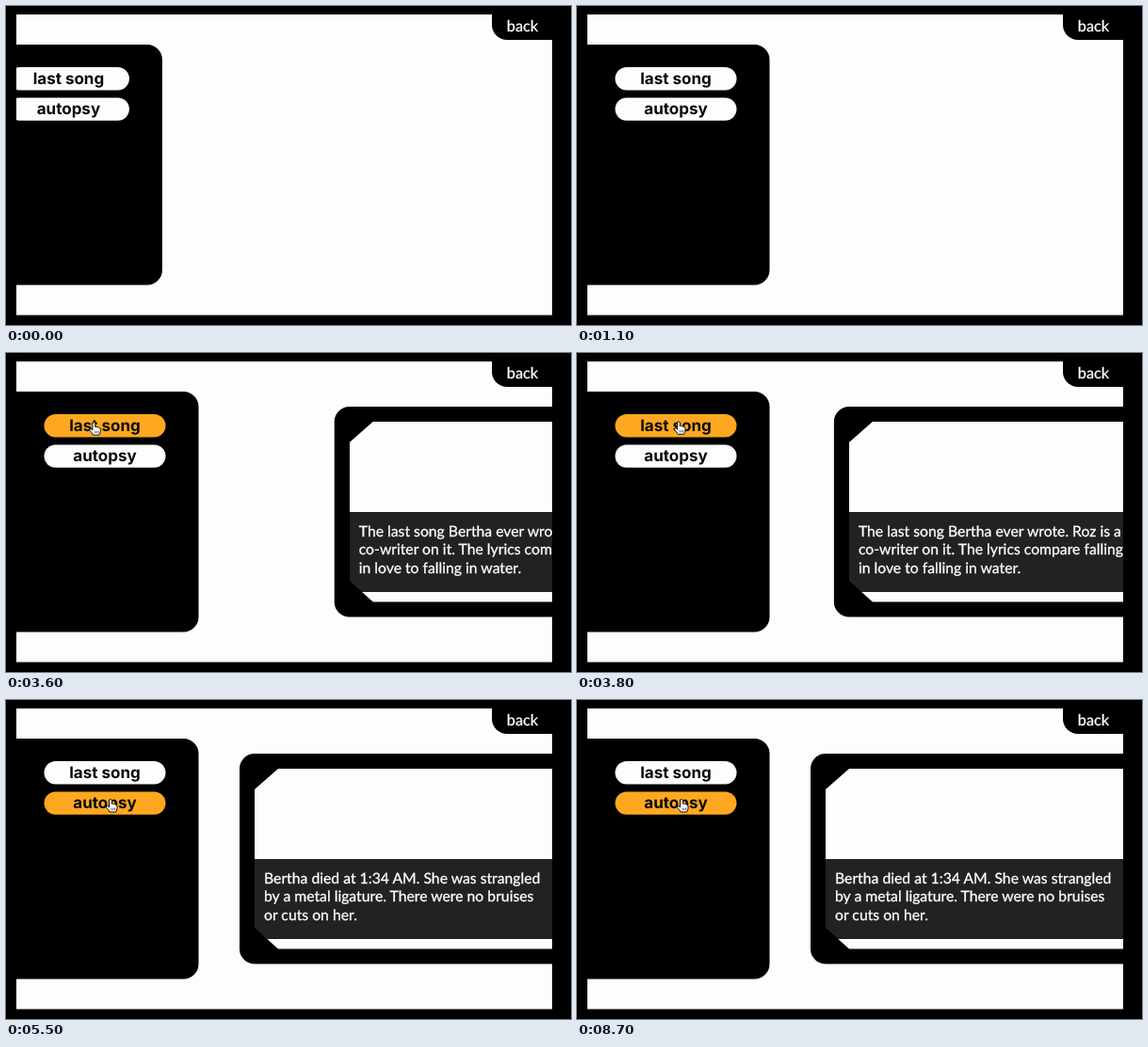
An HTML page that plays this animation: 600 by 339 pixels, repeating every 8800 ms.

```html
<!DOCTYPE html>
<html lang="en">
<head>
<meta charset="utf-8">
<title>Case notes menu</title>
<style>
  html, body { margin: 0; width: 100%; height: 100%; overflow: hidden; background: #000; }
  svg { display: block; width: 100vw; height: 100vh; }
  text { text-rendering: geometricPrecision; }
  .label { font: 700 17px Inter, sans-serif; text-anchor: middle; fill: #080808; }
  .body, .back { fill: #fff; stroke: #fff; stroke-width: .3px; }
  .body { font: 400 15.75px Lato, sans-serif; }
  .back { font: 400 16.3px Lato, sans-serif; text-anchor: middle; }
</style>
</head>
<body>
<svg viewBox="0 0 600 339">
  <defs>
    <clipPath id="stage"><rect x="11" y="9" width="569" height="319.5"/></clipPath>
    <clipPath id="screen"><path d="M289 73H620V264.5H289L264 242V95Z"/></clipPath>
  </defs>
  <rect width="600" height="339"/>
  <g clip-path="url(#stage)">
    <rect x="11" y="9" width="569" height="320" fill="#fefdfe"/>
    <g id="panel">
      <rect x="-40" y="41" width="244.5" height="255.5" rx="16"/>
      <rect id="songButton" x="40.5" y="65" width="129" height="24.5" rx="12.25"/>
      <rect id="autopsyButton" x="40.5" y="97.5" width="129" height="24.2" rx="12.1"/>
      <text class="label" x="105" y="82.5">last song</text>
      <text class="label" x="105" y="115">autopsy</text>
    </g>
    <g id="card">
      <rect x="248" y="57" width="400" height="223.5" rx="16"/>
      <g clip-path="url(#screen)">
        <rect x="264" y="73" width="360" height="96" fill="#fefdfe"/>
        <rect x="264" y="169" width="360" height="85" fill="#232124"/>
        <rect x="264" y="254" width="360" height="11" fill="#fefdfe"/>
      </g>
      <g class="body" id="songNote"></g>
      <g class="body" id="autopsyNote"></g>
    </g>
  </g>
  <path d="M516 0H600V36H532A16 16 0 0 1 516 20Z"/>
  <text class="back" x="548.5" y="27">back</text>
  <g id="cursor">
    <path d="M-1.4 1.2Q0 -.6 1.4 1.2V5.2Q2.8 4.4 3.6 5.5Q5 5 5.6 6.3Q7 6 7 7.8V10Q6.6 11.8 5.6 13.8H-.8Q-2.2 11.2 -4.6 8.8Q-5 6.8 -3 7.4L-1.4 8.8Z"
      fill="#fff" stroke="#111" stroke-width="1" stroke-linejoin="round"/>
    <path d="M1 9.4V12M2.9 9.4V12M4.7 9.4V12" stroke="#222" stroke-width=".7"/>
  </g>
</svg>
<script>
const LOOP = 8800, STEP = 100;
const ORANGE = '#fda820', WHITE = '#fefdfe';
const el = id => document.getElementById(id);

const notes = {
  songNote: ['The last song Bertha ever wrote. Roz is a',
             'co-writer on it. The lyrics compare falling',
             'in love to falling in water.'],
  autopsyNote: ['Bertha died at 1:34 AM. She was strangled',
                'by a metal ligature. There were no bruises',
                'or cuts on her.']
};
for (const [id, lines] of Object.entries(notes)) {
  el(id).innerHTML = lines
    .map((line, i) => `<text x="274" y="${194.6 + i * 19.5}">${line}</text>`).join('');
}

// time, x, y of the fingertip
const cursorPath = [
  [2300, 13, 75], [2900, 61, 75], [3200, 64, 75], [3800, 108, 72.5],
  [4200, 108, 72.5], [4700, 109, 85.7], [5000, 110, 98], [5400, 111, 105.2]
];

const clamp = v => Math.min(1, Math.max(0, v));
const easeOut = p => 1 - (1 - clamp(p)) ** 3;
const easeIn = p => clamp(p) ** 3;

function pointAt(path, t) {
  const next = path.findIndex(point => point[0] > t);
  if (next < 0) return path.at(-1).slice(1);
  if (next === 0) return path[0].slice(1);
  const [t0, x0, y0] = path[next - 1], [t1, x1, y1] = path[next];
  const p = (t - t0) / (t1 - t0);
  return [x0 + (x1 - x0) * p, y0 + (y1 - y0) * p];
}

const move = (id, x, y = 0) => el(id).setAttribute('transform', `translate(${x} ${y})`);
const show = (id, on) => el(id).setAttribute('visibility', on ? 'visible' : 'hidden');
const fill = (id, color) => el(id).setAttribute('fill', color);

function draw(t) {
  const hidden = t < 300 ? easeIn((t + 281) / 481) : 1 - easeOut((t - 320) / 800);
  move('panel', -193.5 * hidden);
  move('card', 333 * (1 - easeOut((t - 3337) / 800)));

  fill('songButton', t >= 2700 && t < 5000 ? ORANGE : WHITE);
  fill('autopsyButton', t >= 5000 ? ORANGE : WHITE);
  show('songNote', t < 5500);
  show('autopsyNote', t >= 5500);

  show('cursor', t >= 2300);
  move('cursor', ...pointAt(cursorPath, t));
}

const start = performance.now();
function tick() {
  const t = (performance.now() - start) % LOOP;
  draw(Math.floor(t / STEP) * STEP);
  requestAnimationFrame(tick);
}
draw(0);
requestAnimationFrame(tick);
</script>
</body>
</html>
```
